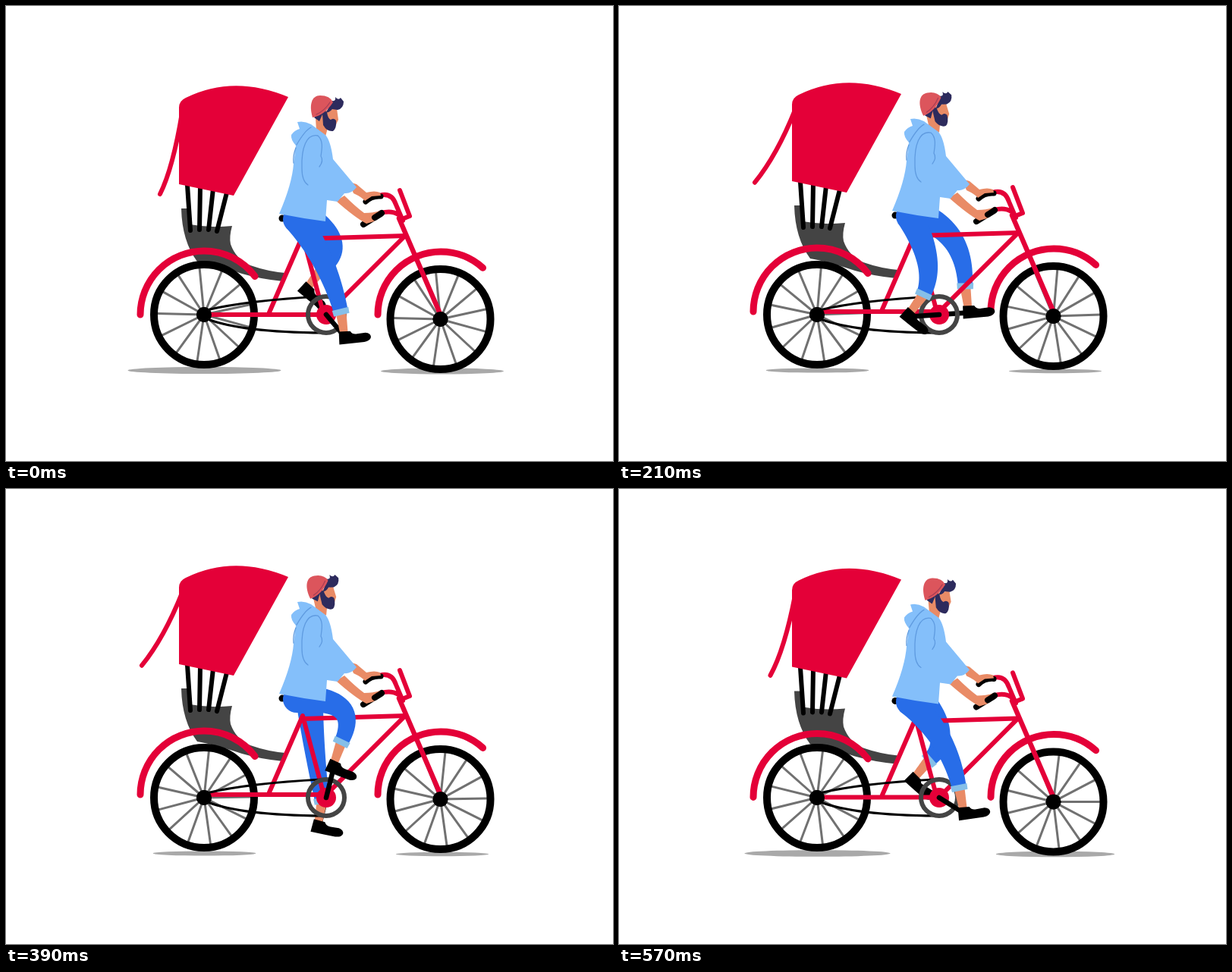
Write an HTML page with a canvas that moves like this. It is 800x600 px and loops after 600 ms.

```html
<!DOCTYPE html>
<html lang="en">
<head>
<meta charset="utf-8">
<title>Cycle rickshaw</title>
<style>
html, body { margin: 0; width: 100%; height: 100%; overflow: hidden; background: #fff; }
canvas { display: block; width: 800px; height: 600px; }
</style>
</head>
<body>
<canvas id="stage" width="800" height="600"></canvas>
<script>
const ctx = document.getElementById('stage').getContext('2d');
const LOOP = 600, STEP = 30, TAU = Math.PI * 2, DEG = Math.PI / 180;
const RED = '#e40038', BLACK = '#000', GREY = '#444', SPOKE = '#717171';
const JEANS = '#286de8', CUFF = '#86bfe8', HOODIE = '#84bffa', FOLD = '#5f9be0';
const SKIN = '#e98b66', HAT = '#dc555c', HAIR = '#2d2b5d';
const CRANK = { x: 422, y: 407, len: 40.5 };

function fill(d, color) {
  ctx.fillStyle = color;
  ctx.fill(new Path2D(d));
}

function line(d, color, width) {
  ctx.strokeStyle = color;
  ctx.lineWidth = width;
  ctx.stroke(new Path2D(d));
}

function oval(x, y, rx, ry, color) {
  ctx.fillStyle = color;
  ctx.beginPath();
  ctx.ellipse(x, y, rx, ry, 0, 0, TAU);
  ctx.fill();
}

function disc(x, y, r, color) { oval(x, y, r, r, color); }

function arc(x, y, r, from, to, color, width) {
  ctx.strokeStyle = color;
  ctx.lineWidth = width;
  ctx.beginPath();
  ctx.arc(x, y, r, from, to);
  ctx.stroke();
}

function shifted(dy, draw) {
  ctx.save();
  ctx.translate(0, dy);
  draw();
  ctx.restore();
}

function wheel(x, y, turn) {
  for (let i = 0; i < 13; i++) {
    const a = turn + i * TAU / 13;
    line(`M${x} ${y}L${x + 62 * Math.cos(a)} ${y + 62 * Math.sin(a)}`, SPOKE, 3);
  }
  arc(x, y, 66, 0, TAU, BLACK, 10);
  disc(x, y, 10, BLACK);
}

// Tapered limb along a quadratic curve from p to q, bent toward c
function limb(p, c, q, rp, rq, color) {
  const left = [], right = [], n = 24;
  for (let i = 0; i <= n; i++) {
    const t = i / n, u = 1 - t;
    const x = u * u * p.x + 2 * u * t * c.x + t * t * q.x;
    const y = u * u * p.y + 2 * u * t * c.y + t * t * q.y;
    const dx = u * (c.x - p.x) + t * (q.x - c.x);
    const dy = u * (c.y - p.y) + t * (q.y - c.y);
    const r = (rp + (rq - rp) * t) / Math.hypot(dx, dy);
    left.push(`${x - dy * r} ${y + dx * r}`);
    right.unshift(`${x + dy * r} ${y - dx * r}`);
  }
  fill('M' + left.concat(right).join('L') + 'Z', color);
}

function mid(p, q) { return { x: (p.x + q.x) / 2, y: (p.y + q.y) / 2 }; }

function pedalAt(a) {
  return { x: CRANK.x + CRANK.len * Math.cos(a), y: CRANK.y + CRANK.len * Math.sin(a) };
}

function crankArm(a) {
  const p = pedalAt(a);
  line(`M${CRANK.x} ${CRANK.y}L${p.x} ${p.y}`, BLACK, 6.5);
}

function leg(hip, a, kneeX) {
  const pedal = pedalAt(a);
  const tilt = (20 + 25 * Math.cos(a - 205 * DEG)) * DEG;
  const c = Math.cos(tilt), s = Math.sin(tilt);
  const foot = (x, y) => ({ x: pedal.x + x * c - y * s, y: pedal.y + x * s + y * c });
  const knee = {
    x: kneeX + 24 * Math.cos(a - 308 * DEG),
    y: 320 - 26 * Math.cos(a - 295 * DEG) + 8 * Math.cos(2 * (a - 30 * DEG))
  };
  const cuff = foot(-5, -35), ankle = foot(-2, -4);
  limb(cuff, mid(cuff, ankle), ankle, 7, 5, SKIN);

  ctx.save();
  ctx.translate(pedal.x, pedal.y);
  ctx.rotate(tilt);
  fill('M-9 -9L6 -9Q9 -4 15 -5L26 -6Q33 -5 33 0Q32 5 24 6L10 7L-9 8Z', BLACK);
  ctx.restore();

  const m = mid(hip, cuff);
  const bend = { x: knee.x + 0.75 * (knee.x - m.x), y: knee.y + 0.75 * (knee.y - m.y) };
  disc(hip.x, hip.y, 18, JEANS);
  limb(hip, bend, cuff, 18, 9.5, JEANS);

  ctx.save();
  ctx.translate(cuff.x, cuff.y);
  ctx.rotate(Math.atan2(cuff.y - bend.y, cuff.x - bend.x) - Math.PI / 2);
  fill('M-11 -4L11 -4L10.5 4L-10.5 4Z', CUFF);
  ctx.restore();
}

function cabin(bob) {
  const k = bob / 5.4;
  const ex = 203 - 33 * k, ey = 248 - 15.6 * k;
  line(`M232 141Q${220 - 16 * k} ${214 - 19 * k} ${ex} ${ey}`, RED, 6);
  fill('M231 267L240 267L242 288Q270 293 298 290Q294 304 296 314Q303 334 322 342' +
       'Q345 350 368 352L365 363Q335 360 311 353Q272 340 252 337Q232 310 231 267Z', GREY);
  line('M239 236L243 296M256 238L255 295M273 241L267 295M291 246L278 297', BLACK, 6);
  fill('M228 235L228 134Q228 125 237 121Q300 90 372 120L300 250Z', RED);
}

function frame() {
  line('M262 407L418 407M347 404L391 303L418 404M391 307L526 303L422 407', RED, 6);
  line('M518 280L573 408', RED, 6.5);
}

function fenders() {
  arc(261, 407, 84, Math.PI, -37 * DEG, RED, 9);
  arc(573, 407, 83, Math.PI, -48 * DEG, RED, 9);
}

function handlebar() {
  line('M519 243L532 277L522 281', RED, 6);
  line('M492 250C505 246 511 253 514 262L523 283M494 273Q508 269 517 275', RED, 6);
}

function head(bob) {
  ctx.save();
  ctx.translate(413, 165);
  ctx.rotate(-0.042 * bob);
  ctx.translate(-413, -165);
  fill('M408 148L420 138L436 135L438 150L433 160L424 161L421 172L409 164Z', SKIN);
  fill('M406 147L413 152L417 143L422 138L413 140Z', HAIR);
  fill('M417 142Q420 137 423 140Q424 148 428 150Q432 147 435 151Q436 161 431 165Q423 166 418 157Z', HAIR);
  fill('M422 140L430 125Q435 126 434 120Q438 125 441 121L445 126Q445 135 437 137L430 136Q426 141 422 140Z', HAIR);
  fill('M404 147C399 130 403 118 414 118Q427 118 431 127Q420 144 404 147Z', HAT);
  line('M409 143Q420 138 427 127', '#a83e55', 1.2);
  ctx.restore();
}

function torso(bob) {
  // Far arm
  line('M474 258Q482 250 494 251', BLACK, 7);
  fill('M452 232L462 235L475 246Q486 243 493 246L494 250L482 251L473 257Q469 252 458 247Z', SKIN);
  // Near arm
  line('M471 288L495 273', BLACK, 8);
  fill('M435 257L446 250Q460 264 472 273Q484 273 493 270L495 275L485 284L475 287Q460 279 435 257Z', SKIN);
  line('M486 279L494 274', BLACK, 8);
  head(bob);
  fill('M360 274Q377 235 379 208L382 184Q375 176 376 170Q380 164 387 162L384 153' +
       'Q393 151 402 156L421 170Q428 178 431 202L462 239Q455 248 446 247L437 258' +
       'L423 256L421 284Q390 280 360 274Z', HOODIE);
  line('M383 183Q394 164 402 160M382 187Q378 197 379 207', FOLD, 1.3);
  line('M411 171C396 168 389 187 390 214Q390 231 398 236M411 171C419 178 416 190 415 198Q419 204 413 212', FOLD, 1.3);
}

function chain() {
  line('M264 401Q320 388 416 383M266 413Q310 430 418 431', BLACK, 3);
}

function scene(t) {
  const bob = 3 * (1 - Math.cos(TAU * t / 300));
  const near = 50 * DEG + TAU * t / LOOP, far = near + Math.PI;
  const turn = (-95.5 + 9.4 * t / STEP) * DEG;

  ctx.fillStyle = '#fff';
  ctx.fillRect(0, 0, 800, 600);
  oval(261.5, 480.5, 101 - 8.45 * bob, 4.6 - 0.4 * bob, '#a9a9a9');
  oval(575, 481.5, 81 - 5.05 * bob, 4 - 0.3 * bob, '#a9a9a9');

  shifted(-bob, () => cabin(bob));
  wheel(261, 407, turn);
  wheel(572.5, 413 - bob, turn);
  shifted(-bob, fenders);
  shifted(-bob, () => disc(364, 280, 4.5, BLACK));

  crankArm(far);
  leg({ x: 400, y: 282 - bob }, far, 428);
  shifted(-bob, frame);
  disc(261, 407, 10, BLACK);
  disc(572.5, 413 - bob, 10, BLACK);
  chain();
  arc(CRANK.x, CRANK.y, 24, 0, TAU, GREY, 6);
  disc(CRANK.x, CRANK.y, 13, RED);
  crankArm(near);
  leg({ x: 383, y: 281 - bob }, near, 424);
  shifted(-bob, () => { handlebar(); torso(bob); });
}

ctx.lineCap = 'round';
ctx.lineJoin = 'round';

function tick() {
  const t = performance.now() % LOOP;
  scene(Math.floor(t / STEP) * STEP);
  requestAnimationFrame(tick);
}
tick();
</script>
</body>
</html>
```
